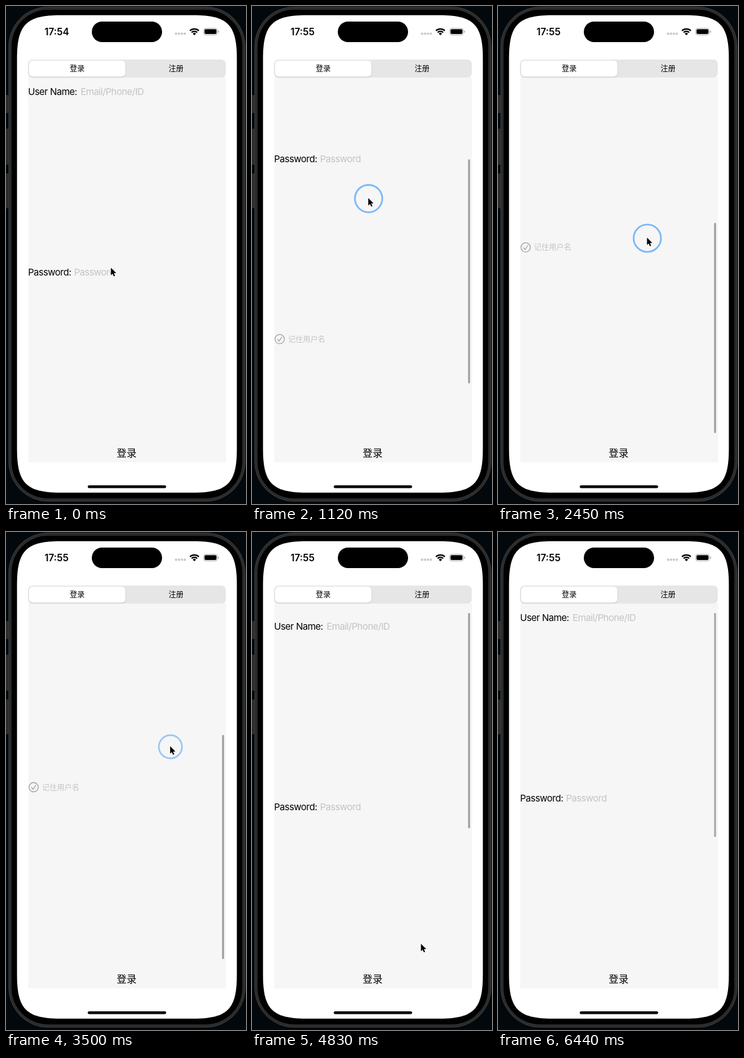
Animation, 386 px wide and 800 px high, one loop 6.51 s. Source, as an HTML page:

```html
<!DOCTYPE html>
<html lang="zh">
<head>
<meta charset="utf-8">
<style>
  html, body { margin: 0; width: 100%; height: 100%; overflow: hidden; background: #03080d; }
  svg { display: block; width: 386px; height: 800px; }
  text { font-family: Inter, "Noto Sans CJK SC", "Noto Sans CJK", sans-serif; }
  .field { font-size: 15px; letter-spacing: -.5px; }
  .hint { fill: #c3c3c5; }
  .small { font-size: 12px; }
  .mid { text-anchor: middle; }
</style>
</head>
<body>
<svg viewBox="0 0 386 800">
  <defs>
    <clipPath id="view"><rect x="30" y="128" width="324" height="560"/></clipPath>
    <filter id="lift" x="-5%" y="-20%" width="110%" height="150%">
      <feDropShadow dx="0" dy="1" stdDeviation="1.2" flood-opacity=".16"/>
    </filter>
  </defs>

  <!-- Phone body -->
  <rect width="386" height="800" fill="#03080d"/>
  <g fill="#2b2c2d">
    <rect x="-3" y="143" width="7" height="29" rx="1"/>
    <rect x="-3" y="197" width="7" height="58" rx="1"/>
    <rect x="-3" y="269" width="7" height="56" rx="1"/>
  </g>
  <rect x="4" y="1" width="381" height="795" rx="64" fill="#3c3d3d"/>
  <rect x="5" y="2" width="379" height="793" rx="63" fill="#292a2a"/>
  <rect x="8" y="5" width="373" height="787" rx="60" fill="#3c3c3c"/>
  <rect x="8.7" y="5.7" width="371.6" height="785.6" rx="59" fill="#000"/>
  <path id="screen" fill="#fff"/>
  <rect x="138" y="25" width="113" height="33" rx="16.5"/>
  <rect x="131.500" y="770" width="126" height="4.500" rx="2.250"/>

  <!-- Status bar -->
  <text id="clock" x="62" y="46.800" font-size="15.400" font-weight="600"></text>
  <g fill="#c9c9cb">
    <circle cx="273.500" cy="44.500" r="1.900"/><circle cx="278.200" cy="44.500" r="1.900"/>
    <circle cx="282.900" cy="44.500" r="1.900"/><circle cx="287.600" cy="44.500" r="1.900"/>
  </g>
  <g transform="translate(303 47)">
    <path d="M-7.200-7.200A10.200 10.200 0 0 1 7.200-7.200M-4.500-4.500A6.400 6.400 0 0 1 4.500-4.500" fill="none" stroke="#000" stroke-width="2.200"/>
    <path d="M0 0L-2.600-2.600A3.700 3.700 0 0 1 2.600-2.600Z"/>
  </g>
  <rect x="317.900" y="35.900" width="22" height="10.600" rx="3.300" fill="none" stroke="#aaa"/>
  <rect x="319.300" y="37.300" width="19.200" height="7.800" rx="2"/>
  <path d="M341.200 39.300q1.600.6 1.600 1.900t-1.600 1.900z" fill="#aaa"/>

  <!-- Page -->
  <rect x="36" y="114" width="318" height="619" fill="#f6f6f6"/>
  <rect x="35.500" y="86" width="318" height="29" rx="7" fill="#e6e6e7"/>
  <rect x="37" y="87.700" width="155" height="25.500" rx="6" fill="#fff" filter="url(#lift)"/>
  <text class="small mid" x="114.500" y="104.600" font-weight="500">登录</text>
  <text class="small mid" x="273.500" y="104.600">注册</text>

  <g clip-path="url(#view)">
    <g id="content">
      <text class="field" x="35.500" y="143.300">User Name:</text>
      <text class="field hint" x="120" y="143.300">Email/Phone/ID</text>
      <text class="field" x="35.500" y="433">Password:</text>
      <text class="field hint" x="109.500" y="433">Password</text>
      <g fill="none" stroke="#a2a2a2" stroke-width="1.300" stroke-linecap="round" stroke-linejoin="round">
        <circle cx="44.500" cy="717" r="7.500"/>
        <path d="M41.200 717.500l2.400 2.900 4.300-6.500"/>
      </g>
      <text class="small hint" x="58" y="721.500">记住用户名</text>
    </g>
    <rect id="bar" x="347.600" width="3" rx="1.500"/>
  </g>
  <text class="mid" x="194" y="723.700" font-size="16">登录</text>

  <circle id="ring" fill="none" stroke="#7ab7f7" stroke-width="2.700"/>
  <path id="arrow" d="M0 0V12L2.800 9.500 4.700 13.900 6.700 13 4.800 8.800 8.500 8.500Z" stroke="#fff" stroke-width="1.300" paint-order="stroke"/>
</svg>
<script>
  const LOOP = 6510, STEP = 70;
  const MAX_SCROLL = 307, SLOP = 13, RUBBER = .55, SPRING = 110, RING_FADE = 150;

  // Each drag starts from the previous resting scroll and springs to its own.
  const drags = [
    { down: 430, up: 1300, from: [176, 504], to: [192, 228], rest: MAX_SCROLL },
    { down: 2000, up: 2550, from: [234, 426], to: [242, 354], rest: MAX_SCROLL },
    { down: 3450, up: 4650, from: [263, 342], to: [272, 662], bow: 9, rest: 0 }
  ];
  const idle = { up: 0, to: [169, 421], rest: 0 };

  const el = id => document.getElementById(id);
  const clamp = (v, lo = 0, hi = 1) => Math.max(lo, Math.min(hi, v));
  const mix = (a, b, p) => a.map((v, i) => v + (b[i] - v) * p);
  const smooth = p => p * p * (3 - 2 * p);

  function set(node, attrs) {
    for (const name in attrs) node.setAttribute(name, attrs[name]);
  }

  // Rounded box whose corners ease into the sides.
  function softBox(x, y, w, h, reach, pull) {
    const r = x + w, b = y + h;
    return `M${x} ${y + reach}C${x} ${y + pull} ${x + pull} ${y} ${x + reach} ${y}
      H${r - reach}C${r - pull} ${y} ${r} ${y + pull} ${r} ${y + reach}
      V${b - reach}C${r} ${b - pull} ${r - pull} ${b} ${r - reach} ${b}
      H${x + reach}C${x + pull} ${b} ${x} ${b - pull} ${x} ${b - reach}Z`;
  }

  function dragPoint(drag, t) {
    const p = (t - drag.down) / (drag.up - drag.down);
    const [x, y] = mix(drag.from, drag.to, p ** 1.5);
    return [x + (drag.bow || 0) * Math.sin(Math.PI * p), y];
  }

  function dragScroll(drag, start, t) {
    const moved = drag.from[1] - dragPoint(drag, t)[1];
    const raw = start + Math.sign(moved) * Math.max(0, Math.abs(moved) - SLOP);
    const inside = clamp(raw, 0, MAX_SCROLL);
    return inside + (raw - inside) * RUBBER;
  }

  function scrollAt(t) {
    const i = drags.findLastIndex(d => t >= d.down);
    if (i < 0) return 0;
    const drag = drags[i], start = (drags[i - 1] || idle).rest;
    if (t <= drag.up) return dragScroll(drag, start, t);

    // Critically damped spring, keeping the release speed.
    const end = dragScroll(drag, start, drag.up);
    const speed = end - dragScroll(drag, start, drag.up - 1);
    const gap = end - drag.rest, age = t - drag.up;
    return drag.rest + (gap + (speed + gap / SPRING) * age) * Math.exp(-age / SPRING);
  }

  function pointerAt(t) {
    const i = drags.findIndex(d => t <= d.up);
    if (i < 0) return drags[drags.length - 1].to;
    const drag = drags[i], last = drags[i - 1] || idle;
    if (t >= drag.down) return dragPoint(drag, t);
    return mix(last.to, drag.from, smooth((t - last.up) / (drag.down - last.up)));
  }

  function drawScroll(t) {
    const scroll = scrollAt(t);
    const inside = clamp(scroll, 0, MAX_SCROLL);
    const over = scroll - inside;
    set(el('content'), { transform: `translate(0 ${-scroll})` });
    set(el('bar'), {
      y: 130 + inside / MAX_SCROLL * 196 + Math.max(0, over),
      height: 360 - Math.abs(over),
      opacity: scroll === 0 ? 0 : t < 6440 ? .37 : .32
    });
  }

  function drawPointer(t) {
    const [x, y] = pointerAt(t);
    set(el('arrow'), { transform: `translate(${x - .3} ${y - .6})`, opacity: t < 6230 ? 1 : 0 });

    const press = drags.find(d => t >= d.down && t < d.up + RING_FADE);
    if (!press) return set(el('ring'), { opacity: 0 });
    const grow = clamp((t - press.down) / 80), fade = clamp((t - press.up) / RING_FADE);
    set(el('ring'), {
      cx: x + .2, cy: y + .3,
      r: 13 + 9 * grow + 8 * fade,
      opacity: (.3 + .7 * grow) * (1 - fade)
    });
  }

  function frame(now) {
    const t = Math.floor(now % LOOP / STEP) * STEP;
    el('clock').textContent = t < 490 ? '17:54' : '17:55';
    drawScroll(t);
    drawPointer(t);
    requestAnimationFrame(frame);
  }

  set(el('screen'), { d: softBox(17.7, 14.7, 353.6, 767, 70, 15) });
  frame(0);
</script>
</body>
</html>
```
